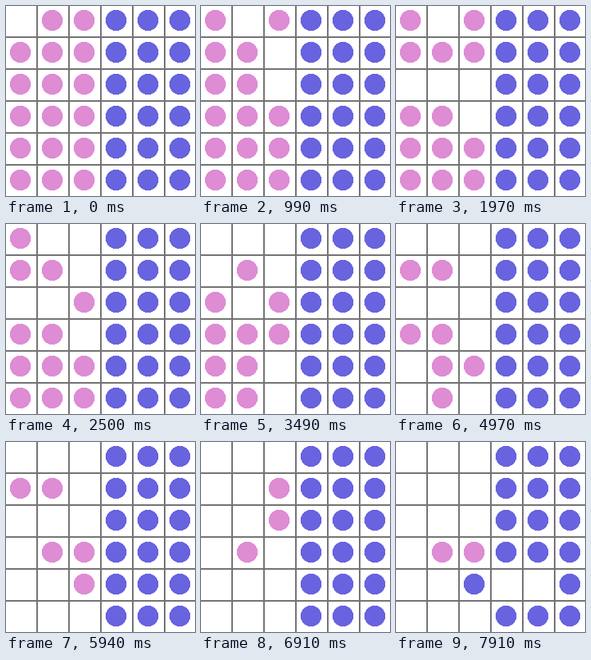
Recreate the animation shown at these times as an HTML page with a canvas. Size 237 px wide and 238 px high, loop 8 s.

```html
<!DOCTYPE html>
<html>
<head>
<meta charset="utf-8">
<title>Peg solitaire</title>
<style>
html, body { margin: 0; height: 100%; overflow: hidden; background: #fff; }
canvas { display: block; }
</style>
</head>
<body>
<canvas id="board" width="237" height="238"></canvas>
<script>
const LOOP = 8000, FIRST_JUMP = 490, JUMP_STEP = 493.3;
const SIZE = 6, PITCH = 40, RADIUS = 13;
const canvas = document.getElementById('board');
const ctx = canvas.getContext('2d');

// Jumps in board notation: column letter, row number, direction
const jumps = 'c1← c3↑ a3→ c4↑ c1↓ a1↓ c6↑ c3↓ a4↑ a6↑ a4→ b6↑ c5↑ a2→ c2↓ e5←'.split(' ');
const directions = { '←': [-1, 0], '→': [1, 0], '↑': [0, -1], '↓': [0, 1] };

function boardAt(time) {
  const pegs = Array.from({ length: SIZE }, () =>
    Array.from({ length: SIZE }, (_, col) => col < SIZE / 2 ? '#de8cd4' : '#6863de'));
  pegs[0][0] = null;
  const count = Math.max(0, Math.floor((time - FIRST_JUMP) / JUMP_STEP) + 1);
  for (const [letter, number, arrow] of jumps.slice(0, count)) {
    const col = 'abcdef'.indexOf(letter), row = number - 1;
    const [dx, dy] = directions[arrow];
    pegs[row + 2 * dy][col + 2 * dx] = pegs[row][col];
    pegs[row][col] = pegs[row + dy][col + dx] = null;
  }
  return pegs;
}

// Disc with hard pixel edges
function disc(x, y, color) {
  ctx.fillStyle = color;
  for (let dy = -RADIUS; dy < RADIUS; dy++) {
    const half = Math.round(Math.sqrt(RADIUS ** 2 - (dy + 0.5) ** 2));
    ctx.fillRect(x - half, y + dy, 2 * half, 1);
  }
}

function draw(now) {
  ctx.fillStyle = '#fff';
  ctx.fillRect(0, 0, canvas.width, canvas.height);
  ctx.fillStyle = '#737373';
  for (let i = 1; i < SIZE; i++) {
    ctx.fillRect(i * PITCH - 2, 0, 2, canvas.height);
    ctx.fillRect(0, i * PITCH - 2, canvas.width, 2);
  }
  boardAt(now % LOOP).forEach((row, r) => row.forEach((color, c) => {
    if (color) disc(18 + c * PITCH, 18 + r * PITCH, color);
  }));
  requestAnimationFrame(draw);
}
draw(performance.now());
</script>
</body>
</html>
```
